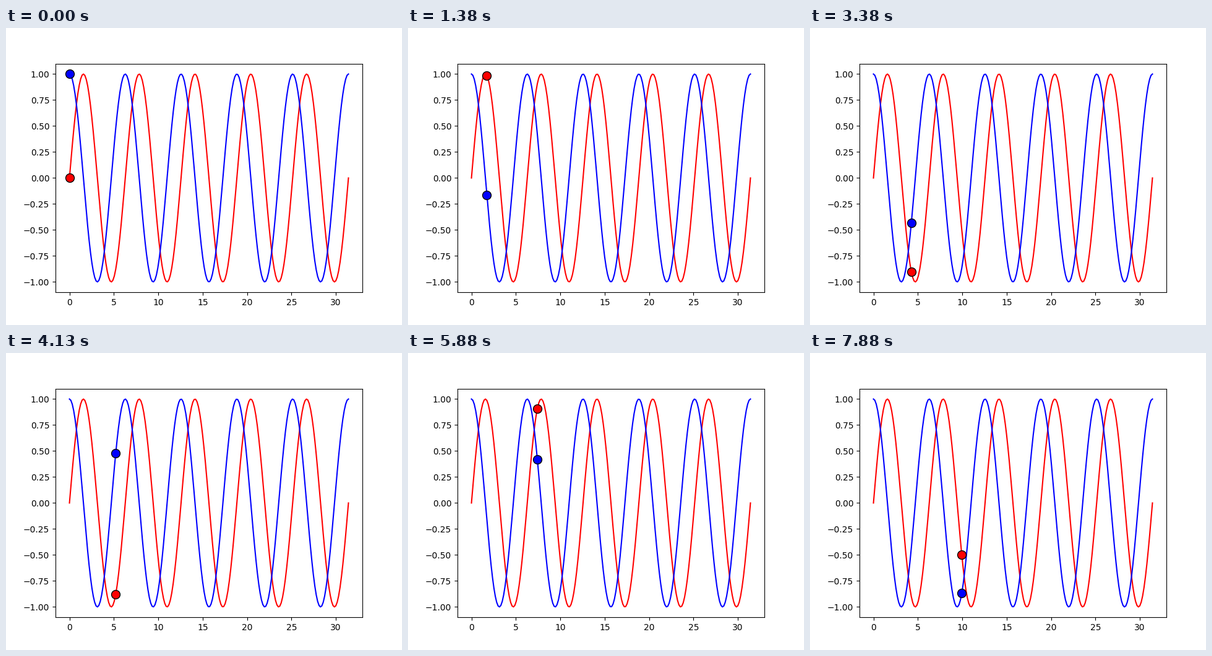
Animation, 640 px wide and 480 px high, one loop 8000 ms. Source, as a matplotlib script:

```python
import numpy as np
import matplotlib.pyplot as plt
from matplotlib.animation import FuncAnimation

FRAMES = 64
INTERVAL = 125

x = np.linspace(0, 10 * np.pi, 200)
waves = [(np.sin(x), "red"), (np.cos(x), "blue")]

fig, ax = plt.subplots(figsize=(6.4, 4.8), dpi=100)

for y, color in waves:
    ax.plot(x, y, color=color)

dots = [
    ax.plot(x[:1], y[:1], "o", color=color, markersize=10, markeredgecolor="black")[0]
    for y, color in waves
]


def update(i):
    for dot, (y, _) in zip(dots, waves):
        dot.set_data([x[i]], [y[i]])
    return dots


anim = FuncAnimation(fig, update, frames=FRAMES, interval=INTERVAL, repeat=True)

plt.show()
```
